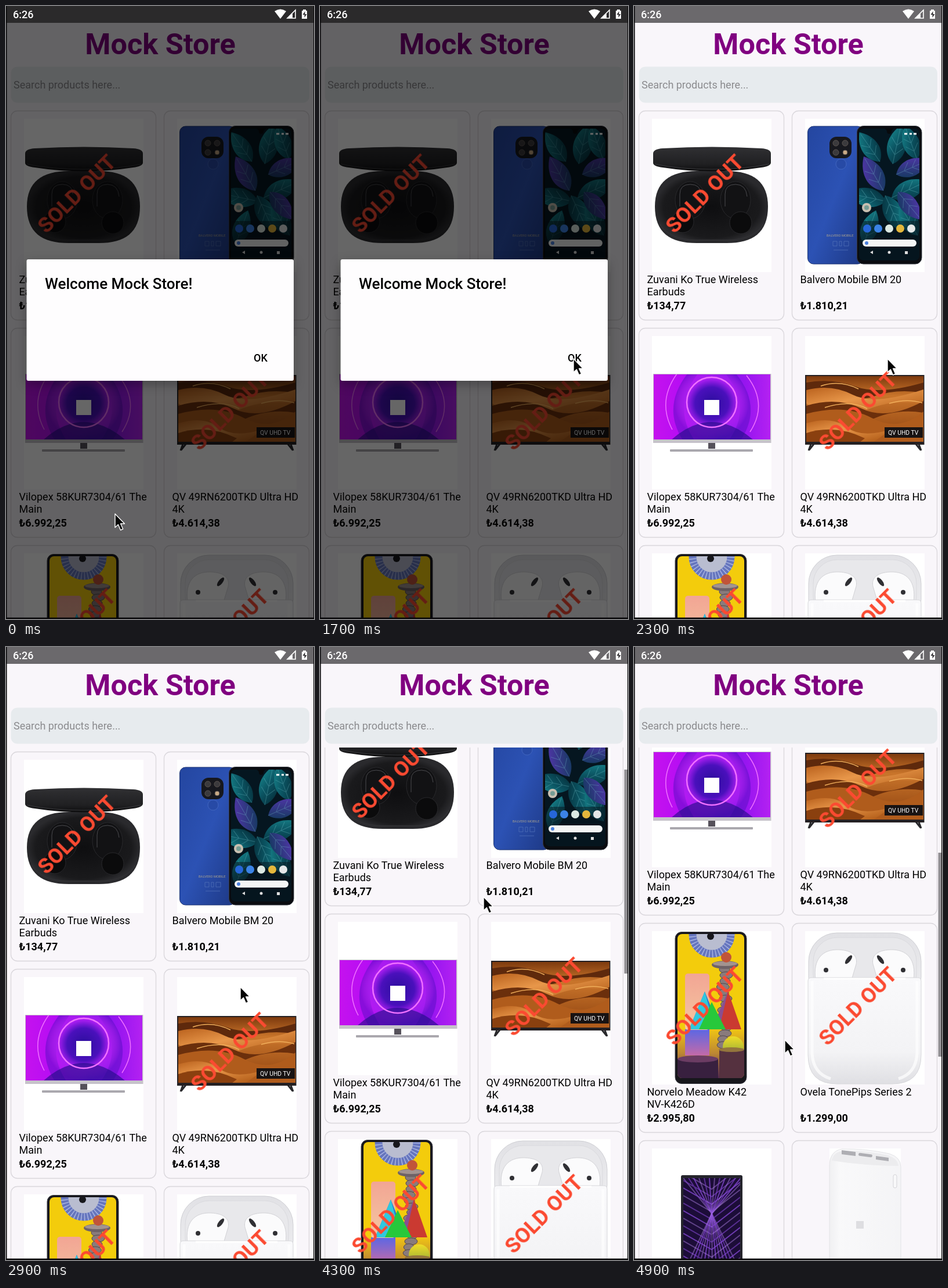
Write an HTML page that moves like this. It is 531x1055 px and loops after 5 s.

```html
<!DOCTYPE html>
<html lang="en">
<head>
<meta charset="utf-8">
<title>Shop app</title>
<style>
html, body { margin: 0; width: 100%; height: 100%; overflow: hidden; background: #f9f6fa; }
svg { display: block; width: 100%; height: 100%; }
text { font-family: Roboto, sans-serif; font-size: 18px; white-space: pre; }
.heading { font-size: 50.4px; font-weight: 700; fill: #800080; text-anchor: middle; }
.price { font-weight: 700; }
.medium { font-weight: 500; }
.sold { font-size: 36.6px; font-weight: 700; fill: #fb4a31; text-anchor: middle; }
.card { fill: none; stroke: #dad7dc; stroke-width: 1.3; }

#list, #thumb, #dim, #dialog, #pointer { animation: 5s step-end infinite; }
#list { animation-name: scroll; }
#thumb { animation-name: thumb; }
#dim { animation-name: dim; }
#dialog { animation-name: dialog; filter: drop-shadow(0 6px 9px rgba(0, 0, 0, .3)); }
#pointer { animation-name: pointer; }

@keyframes scroll {
  0% { transform: translateY(0); }
  86% { transform: translateY(-95px); }
  88% { transform: translateY(-212px); }
  90% { transform: translateY(-308px); }
  92% { transform: translateY(-372px); }
  94% { transform: translateY(-414px); }
  96% { transform: translateY(-439px); }
  98%, 100% { transform: translateY(-453px); }
}
@keyframes thumb {
  0% { transform: translateY(0); opacity: 0; }
  86% { transform: translateY(38px); opacity: 1; }
  88% { transform: translateY(85px); opacity: 1; }
  90% { transform: translateY(123px); opacity: 1; }
  92% { transform: translateY(149px); opacity: 1; }
  94% { transform: translateY(166px); opacity: 1; }
  96% { transform: translateY(176px); opacity: 1; }
  98%, 100% { transform: translateY(181px); opacity: 1; }
}
@keyframes dim {
  0% { opacity: .6; }
  36% { opacity: .34; }
  38% { opacity: .085; }
  40%, 100% { opacity: 0; }
}
@keyframes dialog {
  0% { opacity: 1; }
  36% { opacity: .3; }
  38% { opacity: .015; }
  40%, 100% { opacity: 0; }
}
@keyframes pointer {
  0% { transform: translate(188px, 874px); animation-timing-function: steps(3); }
  6% { transform: translate(222px, 838px); animation-timing-function: steps(4); }
  14% { transform: translate(382px, 666px); animation-timing-function: steps(3); }
  20% { transform: translate(423px, 622px); animation-timing-function: steps(5); }
  30%, 44% { transform: translate(437px, 607px); }
  44% { animation-timing-function: steps(7); }
  58% { transform: translate(404px, 585px); animation-timing-function: steps(9); }
  76%, 84% { transform: translate(278px, 521px); }
  86% { transform: translate(282px, 430px); }
  88% { transform: translate(285px, 312px); }
  90% { transform: translate(285px, 346px); }
  92% { transform: translate(280px, 455px); }
  94% { transform: translate(272px, 560px); }
  96% { transform: translate(264px, 640px); }
  98%, 100% { transform: translate(260px, 676px); }
}
</style>
</head>
<body>
<svg viewBox="0 0 531 1055" preserveAspectRatio="none">
<defs>
  <clipPath id="view"><rect x="1" y="173" width="529" height="880"/></clipPath>
  <clipPath id="leafScreen"><rect x="388" y="211" width="104" height="227" rx="8"/></clipPath>
  <clipPath id="tvScreen"><rect x="34" y="634" width="201" height="112"/></clipPath>
  <clipPath id="duneScreen"><rect x="297" y="637" width="202" height="113"/></clipPath>
  <clipPath id="toyScreen"><rect x="75" y="639" width="115" height="248" rx="8"/></clipPath>
  <clipPath id="tabScreen"><rect x="85" y="914" width="98" height="160"/></clipPath>
  <linearGradient id="lid" x2="0" y2="1"><stop stop-color="#303033"/><stop offset=".7" stop-color="#202022"/><stop offset="1" stop-color="#0d0d0e"/></linearGradient>
  <radialGradient id="tray"><stop stop-color="#0e0e10"/><stop offset=".85" stop-color="#1a1a1c"/><stop offset="1" stop-color="#2a2a2d"/></radialGradient>
  <linearGradient id="blue" x2="1" y2="1"><stop stop-color="#2446a0"/><stop offset=".5" stop-color="#2c52b4"/><stop offset="1" stop-color="#1d3884"/></linearGradient>
  <linearGradient id="leafTeal" x2="1" y2="1"><stop stop-color="#1a8d93"/><stop offset=".5" stop-color="#0b5462"/><stop offset="1" stop-color="#052a36"/></linearGradient>
  <linearGradient id="leafViolet" x2="1" y2="1"><stop stop-color="#5a35b4"/><stop offset="1" stop-color="#0c3a55"/></linearGradient>
  <linearGradient id="violet"><stop stop-color="#c512ee"/><stop offset=".25" stop-color="#b60df4"/><stop offset=".55" stop-color="#7a12e8"/><stop offset=".8" stop-color="#9a16f0"/><stop offset="1" stop-color="#b522f2"/></linearGradient>
  <radialGradient id="glow"><stop stop-color="#2b0e9c"/><stop offset=".45" stop-color="#4a10bc"/><stop offset=".68" stop-color="#a81df0"/><stop offset="1" stop-color="#c42af4" stop-opacity="0"/></radialGradient>
  <linearGradient id="dune" x2="0" y2="1"><stop stop-color="#7d3a0e"/><stop offset=".3" stop-color="#c9752b"/><stop offset="1" stop-color="#8d410f"/></linearGradient>
  <linearGradient id="sand" x2="1" y2="1"><stop stop-color="#b9611d"/><stop offset=".4" stop-color="#e8974a"/><stop offset="1" stop-color="#a8520f"/></linearGradient>
  <linearGradient id="column" x2="0" y2="1"><stop stop-color="#f2a594"/><stop offset="1" stop-color="#f4c7a0"/></linearGradient>
  <linearGradient id="floor" x2="0" y2="1"><stop stop-color="#f0c414"/><stop offset=".5" stop-color="#bb8534"/><stop offset="1" stop-color="#53284f"/></linearGradient>
  <linearGradient id="mirror" x2="0" y2="1"><stop stop-color="#5b67e4"/><stop offset="1" stop-color="#c46aa8"/></linearGradient>
  <linearGradient id="orb" x2="0" y2="1"><stop stop-color="#f0dc27"/><stop offset="1" stop-color="#8aa63a"/></linearGradient>
  <linearGradient id="pearl" x2="0" y2="1"><stop stop-color="#f9f9fb"/><stop offset=".7" stop-color="#f3f3f5"/><stop offset="1" stop-color="#dfdfe3"/></linearGradient>
  <linearGradient id="cover" x2="0" y2="1"><stop stop-color="#e1e1e5"/><stop offset="1" stop-color="#f0f0f2"/></linearGradient>
  <linearGradient id="bank"><stop stop-color="#f0f0f2"/><stop offset=".15" stop-color="#f9f9fa"/><stop offset="1" stop-color="#f4f4f6"/></linearGradient>
  <g id="leaf"><path d="M0 0C-19-14-20-40 0-62C20-40 19-14 0 0Z"/><path d="M0 0V-58M0-15l-11-12M0-15l11-12M0-30l-10-11M0-30l10-11" fill="none" stroke="#7ccbd0" stroke-opacity=".3"/></g>
</defs>

<rect width="531" height="1055" fill="#f9f6fa"/>
<rect width="531" height="29" fill="#6b696c"/>
<text class="heading" x="266" y="83">Mock Store</text>
<rect x="8.5" y="104.500" width="514.500" height="62" rx="11" fill="#e7ebee"/>
<text x="13" y="142" fill="#8b8b8e">Search products here...</text>

<g clip-path="url(#view)">
<g id="list">
  <g id="frames"></g>

  <g id="earbuds">
    <path d="M36 345C36 303 62 284 108 284H160C206 284 231 303 231 345C231 390 205 408 160 408H108C62 408 36 390 36 345Z" fill="url(#tray)"/>
    <path d="M33 254Q33 246 50 245Q134 240 219 245Q236 246 236 254V270Q235 276 219 278Q134 291 50 278Q33 276 33 270Z" fill="url(#lid)"/>
    <path d="M36 272Q80 281 134 281T233 272" fill="none" stroke="#39393c"/>
    <path d="M44 375Q62 403 108 403H160Q206 403 223 375" fill="none" stroke="#303033" stroke-width="2"/>
    <g fill="#121214" stroke="#29292c">
      <ellipse cx="97" cy="334" rx="26" ry="32"/><ellipse cx="175" cy="334" rx="26" ry="32"/>
      <circle cx="84" cy="371" r="19" fill="#0b0b0c"/><circle cx="184" cy="373" r="19" fill="#0b0b0c"/>
    </g>
    <path d="M79 345V324Q79 307 97 307T115 324M157 345V324Q157 307 175 307T195 328" fill="none" stroke="#4a4a4e"/>
  </g>

  <g id="bluePhone">
    <rect x="299.500" y="207" width="96" height="237" rx="10" fill="url(#blue)" stroke="#1b3272"/>
    <rect x="337" y="225" width="38" height="37" rx="12" fill="#17181e"/>
    <g fill="#3b3a3d" stroke="#5a5350"><circle cx="348" cy="236" r="5"/><circle cx="364" cy="236" r="5"/><circle cx="348" cy="252" r="5"/><circle cx="364" cy="252" r="4" fill="#c9aa85"/></g>
    <circle cx="357" cy="272" r="9" fill="#274aa6" stroke="#4266c0"/>
    <text x="332" y="397" style="font-size:5.800px" fill="#a9a28f">BALVERO MOBILE</text>
    <path d="M343 405h7v8h-7zM354 405h4v8h-4zM362 405h8v8h-8zM344 420h25" fill="none" stroke="#5877bb" stroke-opacity=".7"/>
    <rect x="384.500" y="206.500" width="111.500" height="237.500" rx="11" fill="#0a0c10" stroke="#353840"/>
    <g clip-path="url(#leafScreen)">
      <rect x="388" y="211" width="104" height="227" fill="#051620"/>
      <g fill="url(#leafTeal)">
        <use href="#leaf" transform="translate(424 268)rotate(-35)"/><use href="#leaf" transform="translate(446 272)rotate(12)scale(1.1)"/>
        <use href="#leaf" transform="translate(434 336)rotate(-78)scale(1.1)"/><use href="#leaf" transform="translate(444 330)rotate(65)scale(1.1)"/>
        <use href="#leaf" transform="translate(433 326)rotate(155)scale(1.1)"/><use href="#leaf" transform="translate(489 395)rotate(-30)"/>
        <use href="#leaf" transform="translate(396 410)rotate(20)"/><use href="#leaf" transform="translate(488 264)rotate(-20)"/>
      </g>
      <g fill="url(#leafViolet)">
        <use href="#leaf" transform="translate(452 290)rotate(66)"/><use href="#leaf" transform="translate(430 318)rotate(-30)scale(1.1)"/>
        <use href="#leaf" transform="translate(455 320)rotate(140)"/>
      </g>
      <rect x="388" y="370" width="104" height="68" fill="#06151d" opacity=".5"/>
    </g>
    <path d="M432 211h16q-4 2-4 5a4 4 0 0 1-8 0q0-3-4-5" fill="#080a0d"/>
    <path d="M466 220h5m4 0h4m3 0h5" stroke="#fff" stroke-width="3"/>
    <circle cx="401" cy="347" r="8" fill="#c9c0b1"/><circle cx="401" cy="347" r="4" fill="#759c94"/>
    <circle cx="402" cy="383" r="7" fill="#2666d8"/><circle cx="421" cy="383" r="7" fill="#3b83e6"/><circle cx="440" cy="383" r="7" fill="#dce9e3"/>
    <circle cx="459" cy="383" r="7" fill="#e4b73c"/><circle cx="478" cy="383" r="7" fill="#e5e7e8"/>
    <rect x="394" y="402" width="93" height="12" rx="6" fill="#f4f5f5"/><circle cx="401" cy="408" r="3" fill="#4a80df"/>
    <path d="M412 421l-5 3 5 3z" fill="#ddd"/><circle cx="440" cy="424" r="2.500" fill="#ddd"/><path d="M467 422h5v5h-5z" fill="#ddd"/>
  </g>

  <g id="violetTv">
    <rect x="33" y="633" width="203.500" height="119" fill="#c6c3ca"/>
    <g clip-path="url(#tvScreen)">
      <rect x="33" y="633" width="204" height="114" fill="url(#violet)"/>
      <path d="M92 633Q48 690 84 747H104Q66 690 110 633ZM158 633Q204 690 164 747H184Q222 690 176 633Z" fill="#5a0ec4" opacity=".5"/>
      <ellipse cx="134" cy="684" rx="64" ry="62" fill="url(#glow)"/>
      <path d="M64 747Q98 716 134 716T206 747Z" fill="#1f0c86" opacity=".6"/>
      <g fill="none" stroke="#f071ff"><circle cx="134" cy="682" r="43" stroke-width="2.500"/><path d="M74 633Q40 680 66 729M194 636Q232 684 200 733" stroke-width="1.500"/></g>
    </g>
    <path d="M128 752h12v10h-12z" fill="#55515a"/><rect x="62" y="763" width="143" height="4" rx="1" fill="#aaa8ae"/>
    <rect x="121" y="678" width="26" height="26" fill="#fff"/>
  </g>

  <g id="duneTv">
    <path d="M305 754l-4 11m9-11l-8 10M491 754l4 11m-9-11l8 10" stroke="#29292c" stroke-width="3"/>
    <rect x="295" y="635" width="205.500" height="120" fill="#242023"/>
    <g clip-path="url(#duneScreen)">
      <rect x="297" y="637" width="202" height="113" fill="url(#dune)"/>
      <path d="M297 648Q340 640 382 655T499 648v18Q453 658 413 672T297 662Z" fill="#5e290c"/>
      <path d="M297 661Q340 650 377 669T499 660v26Q444 675 398 697T297 684Z" fill="url(#sand)"/>
      <path d="M297 688Q350 672 393 693T499 680v20Q450 692 407 713T297 703Z" fill="#6b2f0c"/>
      <path d="M297 702Q363 684 410 709T499 698v53H297Z" fill="#b05c1c"/>
      <path d="M297 718Q341 705 367 725T445 728L412 751H297Z" fill="url(#sand)"/>
      <path d="M297 735Q347 719 398 744L389 751H297Z" fill="#8a400f"/>
      <path d="M322 654q32-11 65 5m-58 32q44-14 73 2m38-9q30-9 57-1" fill="none" stroke="#f0ae5a" stroke-width="1.500"/>
    </g>
    <rect x="432" y="725" width="66" height="18" fill="#181313"/>
    <text x="438" y="738" fill="#fff" style="font-size:10.400px">QV UHD TV</text>
  </g>

  <g id="toyPhone" transform="translate(0 308)">
    <rect x="71" y="635.500" width="123" height="261" rx="11" fill="#17171c" stroke="#40404a"/>
    <g clip-path="url(#toyScreen)">
      <rect x="75" y="639" width="115" height="248" fill="#f3cc0c"/>
      <rect x="75" y="803" width="115" height="84" fill="url(#floor)"/>
      <circle cx="134" cy="640" r="33" fill="#b9bdd0" stroke="#6575bd" stroke-width="13"/>
      <circle cx="134" cy="640" r="33" fill="none" stroke="#a9b4e1" stroke-width="13" stroke-dasharray="1.500 4"/>
      <path d="M88 803h42v45H88z" fill="url(#mirror)"/><rect x="88" y="707" width="42" height="97" rx="5" fill="url(#column)"/>
      <g id="pillar" fill="#897b7c" stroke="#51474c"></g>
      <ellipse cx="157" cy="692" rx="23" ry="7" fill="#6e6267"/><ellipse cx="157" cy="690" rx="21" ry="4" fill="#a29390"/>
      <circle cx="159" cy="679" r="9" fill="#c15439"/>
      <path d="M122 738L95 803H148Z" fill="#2a78d0"/><path d="M122 738L131 771 112 803H95Z" fill="#2fc8de"/>
      <path d="M162 737L142 803H185Z" fill="#ca3a31"/><path d="M162 737L134 803H147Z" fill="#8a4e90"/>
      <path d="M134 756L112 803H158Z" fill="#27c83b"/>
      <circle cx="171" cy="833" r="18" fill="url(#orb)"/>
      <rect x="147" y="838" width="43" height="49" fill="#55313f"/><ellipse cx="168" cy="838" rx="22" ry="4" fill="#94753d"/>
      <path d="M75 854h70v33H75z" fill="#38203f"/><ellipse cx="110" cy="854" rx="35" ry="6" fill="#6b3c63"/>
    </g>
    <circle cx="132" cy="643" r="6" fill="#17171c"/>
  </g>

  <g id="earCase" transform="translate(0 308)">
    <rect x="301" y="637" width="194" height="125" rx="49" fill="url(#cover)" stroke="#cfcfd4"/>
    <rect x="309" y="645" width="178" height="105" rx="41" fill="#e8e8eb" stroke="#dadade"/>
    <g fill="#fbfbfc" stroke="#d2d2d6">
      <path d="M313 718C308 682 325 665 353 666C377 667 386 677 383 691L375 718Z"/><path d="M482 718C487 682 470 665 442 666C418 667 409 677 412 691L420 718Z"/>
    </g>
    <g fill="#303034"><ellipse cx="370" cy="683" rx="3.500" ry="9" transform="rotate(38 370 683)"/><ellipse cx="425" cy="683" rx="3.500" ry="9" transform="rotate(-38 425 683)"/><circle cx="331" cy="701" r="4"/><circle cx="464" cy="701" r="4"/></g>
    <path d="M300 720Q300 714 306 714H489Q495 714 495 720V847Q495 897 445 897H350Q300 897 300 847Z" fill="url(#pearl)" stroke="#d6d6da"/>
    <path d="M307 720V845Q309 879 339 888M488 720V845Q486 879 456 888" fill="none" stroke="#fff" stroke-width="5" opacity=".7"/>
    <path d="M327 716h141" stroke="#fff" stroke-width="3"/>
  </g>

  <g id="tablet" transform="translate(0 453)">
    <rect x="81" y="909" width="106" height="170" rx="3" fill="#25252c"/>
    <g clip-path="url(#tabScreen)">
      <rect x="85" y="914" width="98" height="160" fill="#1c0d38"/>
      <g id="beams" fill="none" stroke-width="2"></g>
    </g>
  </g>

  <g id="powerBank" transform="translate(0 453)">
    <rect x="337" y="863" width="123" height="264" fill="#fff"/>
    <path d="M337 893Q337 868 358 864Q400 863 440 872Q460 878 460 895V1127H337Z" fill="url(#bank)" stroke="#e4e4e7"/>
    <path d="M341 884Q344 869 361 867Q400 866 438 875Q454 880 456 893Q400 893 341 884Z" fill="#ececee"/>
    <g fill="#aeaeb3"><path d="M358 866l24 3v7l-24-3zM417 876l22 3v6l-22-3z"/><rect x="387" y="872" width="24" height="5" rx="2.500" transform="rotate(7 399 874)"/></g>
    <rect x="447" y="908" width="6" height="23" rx="3" fill="#f8f8f9" stroke="#d4d4d8"/>
    <rect x="383" y="988" width="13" height="13" fill="#dedee1"/>
  </g>

  <g id="labels"></g>
</g>
<rect id="thumb" x="524.500" y="173" width="5.500" height="351" fill="#929094"/>
</g>

<rect id="dim" width="531" height="1055"/>
<g id="status" fill="#fff">
  <text class="medium" x="12" y="21">6:26</text>
  <path d="M463 9Q473 2 483 9L473 22Z"/>
  <path d="M499 7V21H485Z" fill="none" stroke="#fff" stroke-width="1.600"/><path d="M494 13V21H485Z"/>
  <path d="M512 6h5v2h2v14h-9V8h2z"/><path d="M515.500 9l-4 6h3v5l4-6h-3z" fill="#343235"/>
</g>
<g id="dialog">
  <rect x="35.500" y="436" width="460.500" height="209" rx="3" fill="#fefdfe"/>
  <text class="medium" x="67" y="487" style="font-size:26px">Welcome Mock Store!</text>
  <text class="medium" x="427" y="612">OK</text>
</g>
<path d="M0 0H1.500V1055H0ZM530 0H531V1055H530ZM0 1052.500H531V1055H0Z" fill="#09080a"/>
<g id="pointer"><path d="M0 0V23.500L5.400 18.500L9.500 28L13.700 26.200L9.600 17H16.500Z" fill="#050505" stroke="#fff" stroke-width="1.400" stroke-linejoin="round"/></g>
</svg>
<script>
const products = [
  { name: ['Zuvani Ko True Wireless', 'Earbuds'], price: '134,77', sold: true },
  { name: ['Balvero Mobile BM 20'], price: '1.810,21' },
  { name: ['Vilopex 58KUR7304/61 The', 'Main'], price: '6.992,25' },
  { name: ['QV 49RN6200TKD Ultra HD', '4K'], price: '4.614,38', sold: true },
  { name: ['Norvelo Meadow K42', 'NV-K426D'], price: '2.995,80', sold: true },
  { name: ['Ovela TonePips Series 2'], price: '1.299,00', sold: true },
  { name: [] },
  { name: [], narrow: true }
];
const fill = (id, markup) => document.getElementById(id).innerHTML = markup;
const range = (count, draw) => Array.from({ length: count }, (_, i) => draw(i)).join('');
const place = (i, markup) =>
  `<g transform="translate(${i % 2 * 264} ${Math.floor(i / 2) * 374})">${markup}</g>`;

fill('frames', products.map((item, i) => place(i,
  '<rect class="card" x="8.5" y="180.5" width="250" height="360" rx="11"/>' +
  (item.narrow ? '' : '<rect x="31" y="194" width="206" height="264" fill="#fff"/>'))).join(''));

fill('labels', products.map((item, i) => place(i,
  item.name.map((line, n) => `<text x="22.500" y="${477 + n * 21}">${line}</text>`).join('') +
  (item.price ? `<text class="price" x="22.500" y="522">₺${item.price}</text>` : '') +
  (item.sold ? '<text class="sold" transform="translate(121.500 323) rotate(-45)" y="13">SOLD OUT</text>' : ''))).join(''));

fill('pillar', range(14, i =>
  `<ellipse cx="${156 + Math.sin(i * 1.4) * 3}" cy="${700 + i * 10}" rx="${9 + i % 2 * 2}" ry="6"/>`));

fill('beams', range(13, i => {
  const y = 905 + i * 13, color = i % 3 ? '#8045ce' : '#c591ff';
  return `<path d="M85 ${y}L134 ${y + 28}L183 ${y - 10}M${85 + i * 9} 914L134 975L${183 - i * 8} 1074" stroke="${color}" opacity="${.4 + i % 3 * .2}"/>`;
}));
</script>
</body>
</html>
```
